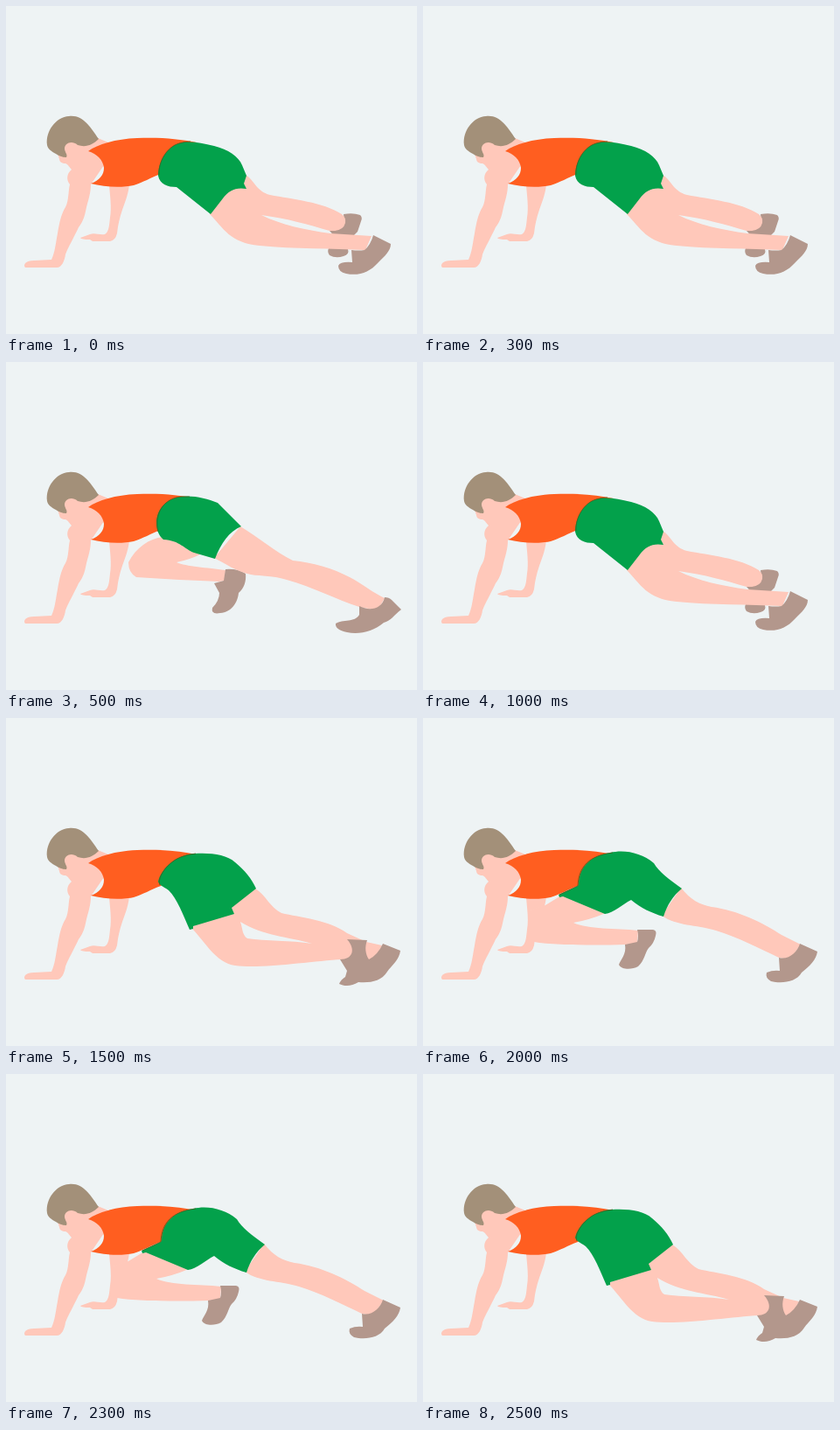
Recreate the animation shown at these times as an HTML page. Size 470 px wide and 375 px high, loop 3 s.

```html
<!DOCTYPE html>
<html lang="en">
<head>
<meta charset="utf-8">
<title>Mountain climber exercise</title>
<style>
  html, body { margin: 0; width: 100%; height: 100%; overflow: hidden; background: #eef3f4; }
  svg { display: block; width: 470px; height: 375px; }
  .skin { fill: #ffc8ba; }
  .hair { fill: #a39079; }
  .top { fill: #ff5e20; }
  .shorts { fill: #03a14b; }
  .shoe { fill: #b3978c; }
  .hem { fill: none; stroke: #4d5a1c; stroke-width: .8; }
</style>
</head>
<body>
<svg viewBox="0 0 470 375">
  <!-- far arm -->
  <path class="skin" d="M118 205C119 218 121 230 119 242C118 250 118 258 113 261C107 262 101 259 96 261L85 265Q86 267 96 267L99 269L119 269Q125 268 127 260C128 250 130 242 133 233C137 222 140 214 141 204Z"/>
  <g id="legs"></g>
  <!-- neck, face, near arm -->
  <path class="skin" d="M105 151L117 156L112 182L97 204C97 214 94 222 92 230C90 240 89 245 83 253C78 264 71 276 68 284C67 291 64 299 58 299L22 299Q20 297 22 294Q25 291 32 291L52 290C56 282 57 270 59 260C61 248 63 238 68 230C72 222 71 212 73 204C69 199 69 192 75 187C72 184 71 181 68 180C64 180 61 178 61 175L59 169L70 155L90 154Z"/>
  <path class="hair" d="M47 159C45 143 57 127 72 126C88 124 97 139 106 152C99 159 91 162 82 159C75 153 67 157 67 163C67 167 71 170 69 173C64 173 60 171 57 169C52 166 48 164 47 159Z"/>
  <path class="top" d="M94 166C105 158 125 152 150 151C178 150 198 152 218 156L190 180L177 192C166 196 156 202 146 205C132 208 112 207 97 203C107 199 112 193 112 185C111 176 104 169 94 166Z"/>
  <g id="hips"></g>
</svg>
<script>
// Each pose: limbs and shoes in paint order, then shorts and the hem against the top.
const together = {
  legs: [
    ["shoe", "M386 238Q397 236 405 239Q408 242 406 246L402 258L398 262L391 278Q393 284 386 286Q377 289 370 285Q367 281 369 277L380 268L370 257Q384 257 387 247Z"],
    ["skin", "M274 193C284 199 286 212 302 216C328 221 362 224 384 238Q389 242 388 248Q386 256 376 257L370 257C346 250 322 243 292 239C314 250 342 256 371 260L418 263L411 279C372 277 330 278 290 274C256 271 249 254 233 238L250 205Z"],
    ["shoe", "M420 262L440 272C440 280 433 286 425 294C416 304 404 309 389 306Q380 304 380 297Q382 292 396 293L395 279Q403 280 410 279Q417 273 420 262Z"]
  ],
  shorts: "M174 194C174 178 184 161 198 157C208 154 222 156 238 160C254 164 266 172 270 182L275 194L272 203L275 209C262 207 255 211 248 220L234 238L195 207C185 207 176 204 174 194Z",
  hem: "M175 193C174 178 184 161 198 157Q204 155 211 155"
};
const nearBack = {
  legs: [
    ["skin", "M180 200C163 202 149 212 140 229Q140 241 149 246C180 248 218 250 243 251L250 250L251 238C230 235 206 234 195 229Q210 226 222 220L204 205Z"],
    ["shoe", "M251 237Q265 236 274 242C275 251 272 259 266 264C265 275 258 286 245 287Q234 289 236 281Q244 273 244 264L238 253L249 250Z"],
    ["skin", "M268 188C288 200 308 217 328 227C350 229 374 236 393 246C408 254 420 264 433 270L425 284L404 280C379 272 350 257 321 249C306 244 292 245 280 243C264 240 250 230 238 224Z"],
    ["shoe", "M433 269Q438 269 441 272L452 283C443 290 440 296 432 298C420 308 404 312 390 309Q376 306 377 299C385 294 399 298 404 289L404 279C415 285 430 283 433 269Z"]
  ],
  shorts: "M172 184C172 168 184 156 200 154C214 152 229 156 242 161L269 188C255 194 246 207 239 225L215 218C204 214 199 204 180 203C175 199 172 192 172 184Z",
  hem: "M174 194C169 174 180 156 200 154L210 154"
};
const kneesLow = {
  legs: [
    ["skin", "M285 195C297 202 302 217 315 223C336 228 370 231 390 246L412 256L430 260L422 276L384 276C350 278 292 287 262 283C240 280 228 256 212 240L255 210ZM268 233C271 242 270 248 276 252C297 255 325 254 350 258C323 250 293 249 268 233Z"],
    ["shoe", "M390 253L413 254C410 262 411 270 415 276Q425 271 431 258L451 266C450 276 441 283 436 290C429 301 417 303 403 302C395 307 387 307 381 304Q383 299 388 296L390 289L382 276C397 276 400 264 390 253Z"]
  ],
  shorts: "M174 187C178 171 195 156 216 155C235 154 252 156 262 165C273 174 281 184 286 195L258 217L261 224L214 238L214 241L210 242C202 224 196 207 186 197C179 192 175 191 174 187Z",
  hem: "M176 191C172 182 186 164 200 159Q207 156 217 155"
};
const farBack = {
  legs: [
    ["skin", "M158 203L140 214L122 220L119 250L127 256C150 260 200 260 232 259L245 257L246 243C220 240 189 242 172 234Q190 231 209 223Z"],
    ["shoe", "M245 242L263 242Q268 243 266 249Q264 258 258 263C254 268 253 278 246 284C239 288 227 288 224 282C226 276 233 270 231 259L245 256Q247 249 245 242Z"],
    ["skin", "M295 194C306 208 316 213 330 216C360 220 389 234 410 248L432 259L420 276L407 274C386 264 359 250 335 243C311 236 291 238 273 226Z"],
    ["shoe", "M431 258L451 267C450 276 442 284 433 291C427 302 410 304 398 301Q391 297 393 291Q400 288 408 289L407 274C418 277 428 268 431 258Z"]
  ],
  shorts: "M178 190C179 168 194 157 214 154C230 150 250 154 264 166C270 176 281 184 296 195C286 203 279 214 275 227C261 223 249 217 238 208C228 213 218 223 208 224L160 204L156 205L155 202L177 192Z",
  hem: "M156 202L177 192C178 170 190 157 217 154"
};

const poses = [together, nearBack, together, kneesLow, farBack, kneesLow];
const hold = 500;
const legs = document.getElementById("legs");
const hips = document.getElementById("hips");
const path = ([kind, d]) => `<path class="${kind}" fill-rule="evenodd" d="${d}"/>`;
let shown;

function draw(now) {
  const pose = poses[Math.floor(now / hold) % poses.length];
  if (pose !== shown) {
    legs.innerHTML = pose.legs.map(path).join("");
    hips.innerHTML = path(["shorts", pose.shorts]) + path(["hem", pose.hem]);
    shown = pose;
  }
}

const start = performance.now();
function tick() {
  draw(performance.now() - start);
  requestAnimationFrame(tick);
}
tick();
</script>
</body>
</html>
```
